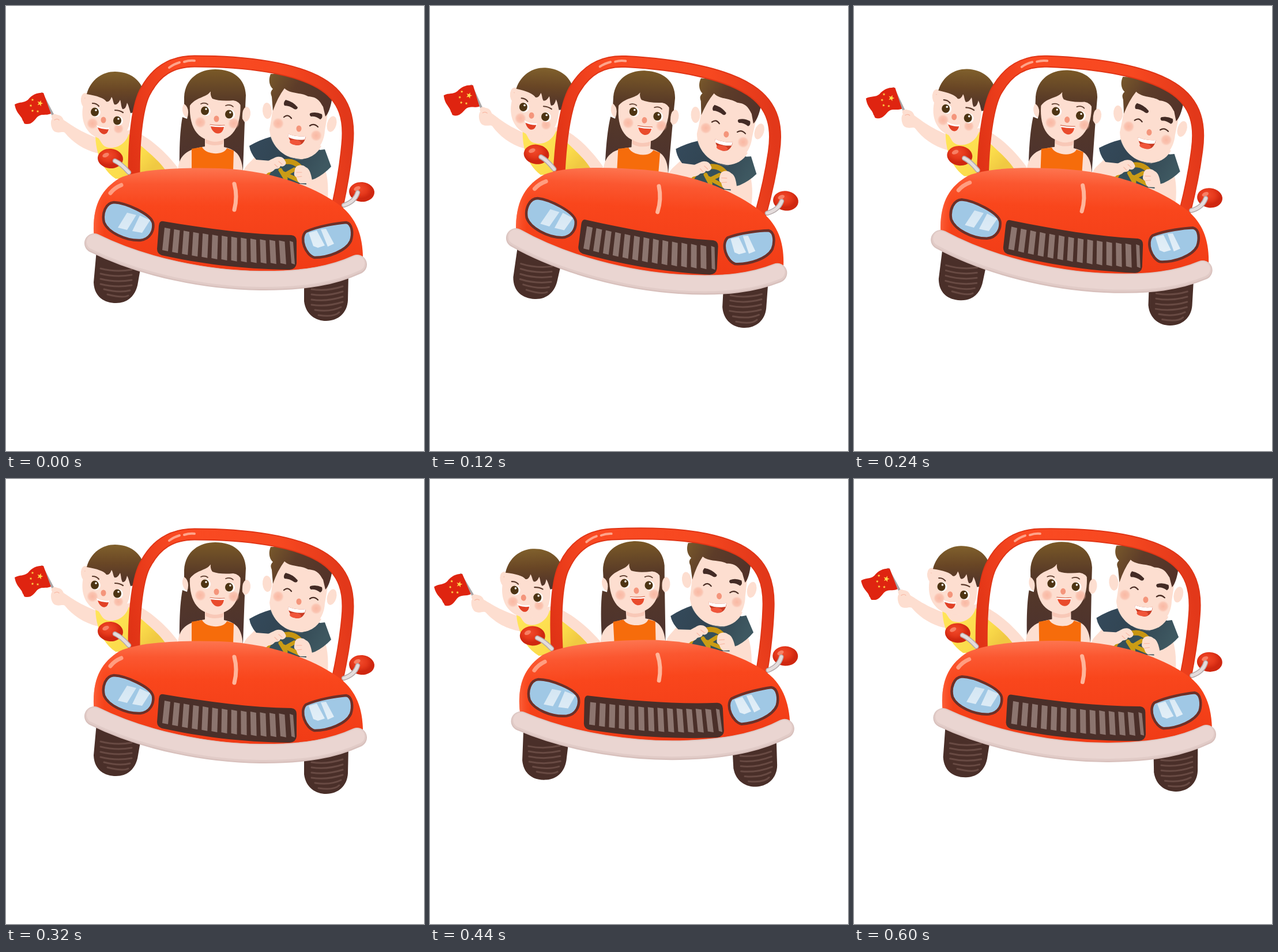
An HTML page that plays this animation: 725 by 773 pixels, repeating every 0.64 s.

```html
<!DOCTYPE html>
<html>
<head>
<meta charset="utf-8">
<style>
html, body { margin: 0; width: 100%; height: 100%; overflow: hidden; background: #fff; }
svg { display: block; width: 100%; height: 100%; }
</style>
</head>
<body>
<svg viewBox="0 0 725 773" fill="none" stroke-linecap="round" stroke-linejoin="round">
  <defs id="defs"></defs>
  <g id="scene"></g>
</svg>
<script>
const SKIN = '#fdded0', BLUSH = '#f9b8a3', BROWN = '#4a2f29', RED = '#e5381b';

const shape = (d, fill, extra = '') => `<path d="${d}" fill="${fill}" ${extra}/>`;
const line = (d, color, w) => `<path d="${d}" stroke="${color}" stroke-width="${w}"/>`;
const oval = (x, y, rx, ry, fill, rot = 0) =>
  `<ellipse cx="${x}" cy="${y}" rx="${rx}" ry="${ry}" fill="${fill}" transform="rotate(${rot} ${x} ${y})"/>`;
const gradient = (id, dir, ...stops) => {
  const [x1, y1, x2, y2] = dir;
  return `<linearGradient id="${id}" gradientUnits="userSpaceOnUse" x1="${x1}" y1="${y1}" x2="${x2}" y2="${y2}">` +
    stops.map(([at, c, o = 1]) => `<stop offset="${at}" stop-color="${c}" stop-opacity="${o}"/>`).join('') +
    '</linearGradient>';
};
const times = (n, f) => Array.from({ length: n }, (_, i) => f(i)).join('');

const eye = (x, y) => oval(x + 2, y + .5, 8, 8.5, '#fff') + oval(x, y, 7, 7.5, '#4d3413') +
  oval(x + 2, y - 3, 1.8, 1.8, '#fff');
const cheek = (x, y, r = 10) => oval(x, y, r, r, 'url(#blush)');
const nose = (x, y) => oval(x, y, 4.5, 5.5, '#f4957b');
const star = (x, y, r, turn) => {
  const pts = Array.from({ length: 10 }, (_, i) => {
    const a = turn + i * Math.PI / 5, q = i % 2 ? r * 0.4 : r;
    return `${x + q * Math.sin(a)},${y - q * Math.cos(a)}`;
  });
  return `<polygon points="${pts.join(' ')}" fill="#ffd84a"/>`;
};

const flag = () =>
  line('M62 152L86 198', '#a9a5a6', 4) +
  shape('M15 171C24 166 31 169 38 163C46 153 56 150 65 151L78 187C69 191 61 186 54 193C48 200 44 206 35 205C30 205 32 202 29 199C27 190 18 188 15 171Z', '#df2410') +
  star(59, 169, 5.5, 0.3) + star(46, 163, 2.6, 0) + star(43, 173, 2.6, 0.4) +
  star(46, 182, 2.6, 0.2) + star(55, 183, 2.6, 0);

const boy = () =>
  shape('M155 228C124 216 110 204 100 198C96 188 90 190 86 188C80 187 77 191 80 196C76 200 78 214 84 218C92 222 98 217 102 220C115 236 134 250 160 256Z', SKIN) +
  line('M84 198C87 196 90 196 92 198', BLUSH, 1.2) +
  shape('M158 226L218 215C250 228 278 255 298 281L280 295L200 297C170 285 160 260 158 226Z', SKIN) +
  shape('M155 226C165 230 163 240 174 245C190 250 208 240 213 222C222 236 262 262 277 286L240 300L190 300C166 284 156 255 155 226Z', 'url(#yellow)') +
  oval(139, 165, 9, 14, SKIN, -10) + line('M137 160Q142 164 141 171', BLUSH, 1.5) +
  shape('M142 150C130 172 129 198 141 215C154 234 184 238 201 227C216 217 218 190 215 165Z', SKIN) +
  cheek(150, 204) + cheek(195, 213, 9) +
  shape('M140 153C147 127 168 114 189 114C214 114 236 128 240 154L228 184L216 186C214 180 213 173 210 168C208 177 206 179 202 179C199 173 200 169 198 163C195 169 192 172 188 171C185 166 186 162 183 158C181 164 178 167 174 166C170 160 158 156 140 153Z', 'url(#hair)') +
  eye(154, 184) + eye(193, 199) +
  line('M150 169Q157 169 161 174M189 181Q197 181 203 185', '#5a3a2c', 2.2) + nose(169, 198) +
  shape('M157 207Q168 213 179 211C179 225 165 228 157 207Z', '#fff') +
  shape('M159 211Q169 215 178 214C176 226 164 226 159 211Z', '#e14126');

const girl = () =>
  oval(314, 181, 8, 13, SKIN, -8) + oval(416, 188, 8, 13, SKIN, 8) +
  shape('M309 158C311 125 336 110 363 110C394 110 415 126 416 155L415 176Q409 180 410 196L414 202L411 285L301 285Q300 225 306 193L314 196Q320 178 309 170Z', 'url(#hair2)') +
  shape('M345 225H378V245C398 249 409 258 411 288H298C299 262 310 249 345 244Z', SKIN) +
  shape('M346 231Q362 240 378 232L376 240Q358 245 346 238Z', '#f8c8b7') +
  shape('M322 248L340 245C347 259 378 260 383 247L395 251L394 286H322Z', '#f66c0b') +
  shape('M320 160C315 198 325 234 362 234C397 235 410 200 406 163Q362 135 320 160Z', SKIN) +
  cheek(337, 202) + cheek(395, 204) +
  shape('M317 176Q312 136 358 130Q408 132 410 178Q405 165 394 164Q371 166 358 161Q354 156 355 148C348 160 328 157 317 176Z', 'url(#hair2)') +
  eye(345, 182) + eye(387, 188) +
  line('M338 170Q345 167 350 171M381 173Q389 170 394 175', '#5a3a2c', 1.7) + nose(365, 196) +
  shape('M354 206Q366 209 379 207C378 226 358 226 354 206Z', '#fff') +
  shape('M355 209Q367 211 378 210C376 226 359 225 355 209Z', '#e94b2c') +
  line('M354 206Q366 208 379 207', '#d66a50', 1.2);

const man = () =>
  shape('M435 258C424 273 415 275 411 290L450 300L480 280ZM520 290L554 285Q560 305 558 335L510 310Z', SKIN) +
  shape('M422 243Q441 232 460 227L545 250L553 249L564 279Q552 292 536 300L500 312L443 302L449 288L459 269L434 267Q424 256 422 243Z', 'url(#navy)') +
  shape('M458 224C466 248 488 266 514 266C528 264 540 257 547 243Z', SKIN) +
  line('M459 228C467 248 490 268 514 267', '#526570', 1.5) +
  oval(453, 182, 8, 14, SKIN, -4) + oval(565, 205, 8, 14, SKIN, 15) +
  shape('M465 145C464 178 459 204 457 215C460 248 488 266 506 264C537 263 552 239 553 216L561 170L545 145L483 130Z', SKIN) +
  cheek(472, 204) + cheek(538, 225) +
  shape('M459 118C454 130 458 140 463 144C457 150 460 154 461 158L463 182Q471 159 483 143C493 153 512 150 524 157C540 158 544 165 550 175L554 192Q562 184 566 158L545 134L500 118Z', 'url(#hair3)') +
  shape('M485 163Q498 166 506 176Q505 181 500 179Q492 173 483 173Q480 168 485 163ZM528 186Q538 183 548 188Q550 195 545 197Q537 191 529 192Q525 189 528 186Z', '#432b25') +
  line('M482 193Q489 187 495 195M527 208Q534 203 541 210', '#4b2e25', 2.2) + nose(508, 213) +
  shape('M489 222Q503 228 520 226C517 249 492 247 489 222Z', '#c93c24') +
  shape('M489 222Q503 228 520 226L518 232Q502 234 490 228Z', '#fff') +
  oval(502, 237, 10, 4.5, '#f0553a', 8) +
  shape('M447 303C451 278 471 267 494 268Q519 273 521 310Z', '#35505a') +
  line('M449 302C454 280 470 270 490 270C505 271 515 282 517 300', '#c79511', 9) +
  line('M476 285L485 300M500 284L482 294M482 291L508 303', '#cb9c15', 7) +
  shape('M447 279C447 271 460 267 467 263C475 260 482 263 484 269C489 274 481 281 476 278C474 285 467 281 465 285C460 290 454 288 452 292L432 294Z', SKIN) +
  shape('M501 284C502 276 514 274 520 280C528 283 530 297 532 308L510 308C504 304 505 299 503 297C498 294 500 290 501 284Z', SKIN) +
  line('M466 275L471 280M473 270L479 275M504 289L513 289M505 297L513 296', BLUSH, 1.2);

const mirror = (x, y, arm) =>
  oval(x, y, 22, 17, 'url(#mirror)', 5) + oval(x - 8, y - 6, 6, 3.5, '#f78065', -25) +
  line(arm, '#b5a9aa', 8.5) + line(arm, '#e4dcdc', 5.5);

const frame = () => {
  const d = 'M222 292C222 230 228 170 243 146C260 115 285 96 327 96C420 96 500 108 545 134C590 160 596 200 592 240C588 285 582 315 575 347';
  return line(d, '#e03516', 21) + line(d, 'url(#tube)', 17) +
    line('M283 107Q291 101 301 98M309 97Q318 94 327 95', '#ffa48a', 4);
};

const tires = () =>
  shape('M157 425L152 480C153 505 170 516 191 516C212 516 226 502 229 480L236 440Z', BROWN) +
  shape('M517 480V513C520 537 538 547 555 547C576 547 592 533 593 511L594 465Z', BROWN) +
  times(6, i => {
    const y = 456 + i * 9, inset = i > 3 ? (i - 3) * 6 : 0;
    return line(`M${164 + inset} ${y}q27 7 ${54 - 1.5 * inset} 2`, '#684a43', 3) +
      line(`M${530 + inset} ${y + 36}q27 4 ${54 - 1.5 * inset} -5`, '#684a43', 3);
  });

const grille = () =>
  shape('M273 374C350 387 425 397 495 398Q504 399 504 408V447Q503 457 492 458C405 457 335 447 270 433Q262 430 262 422L265 382Q266 372 273 374Z', BROWN) +
  times(14, i => {
    const u = i / 13, x = 280 + 215 * u, lean = -4 + 7 * u;
    const top = 386 + 37 * u - 14 * u * u, end = 425 + 45 * u - 22 * u * u;
    const w = i === 13 ? 3 : 5;
    return shape(`M${x - w} ${top - 1}L${x + w} ${top + 1}L${x + lean + w} ${end + 1}L${x + lean - w} ${end - 1}Z`, '#8c756f');
  });

const lamps = () => {
  const rim = 'stroke="#6d3028" stroke-width="4.5"';
  return shape('M187 341C173 342 166 360 170 376C177 393 207 408 233 407C250 405 257 390 255 377C251 361 208 342 187 341Z', '#a0c8e5', rim) +
    shape('M520 392C542 382 576 377 590 376C601 378 602 396 598 408C590 425 560 437 535 437C520 433 508 404 520 392Z', '#a0c8e5', rim) +
    shape('M210 359L226 363L210 389L194 385ZM232 364L250 372L236 394L219 391Z', 'url(#gleam)') +
    shape('M525 394L539 390L553 416L541 420L533 417ZM546 388L555 387L569 413L558 418Z', 'url(#gleam)');
};

const body = () => {
  const bumper = 'M153 412C240 455 350 476 440 477C520 478 570 467 609 449';
  return shape('M152 390C151 345 166 318 197 299C232 283 305 280 370 282C455 285 532 311 580 347C608 369 620 400 619 445Q540 475 430 470Q260 460 153 408Z', 'url(#hood)') +
    shape('M152 390C151 345 166 318 197 299C175 330 168 360 170 416L153 408Z', 'url(#side)') +
    line('M181 325Q188 316 200 311', '#ff9d80', 7) +
    line('M396 309Q402 331 396 354', '#ffb499', 7) +
    line(bumper, '#d8c0bc', 34) +
    `<g transform="translate(0 -1)">${line(bumper, '#e1cbc7', 31)}</g>` +
    `<g transform="translate(0 -2)">${line(bumper, '#ead5d1', 26)}</g>` +
    lamps() + grille();
};

document.getElementById('defs').innerHTML =
  gradient('hair', [0, 114, 0, 180], [0, '#80602c'], [.5, '#694625'], [1, '#51342a']) +
  gradient('hair2', [0, 110, 0, 270], [0, '#7a5927'], [.35, '#573927'], [1, '#4d332e']) +
  gradient('hair3', [458, 118, 560, 185], [0, '#78582b'], [.4, '#5d3c29'], [1, '#513129']) +
  gradient('yellow', [165, 230, 235, 300], [0, '#ffe458'], [.7, '#fbdc4b'], [1, '#f0c942']) +
  gradient('navy', [430, 240, 540, 300], [0, '#34495a'], [.5, '#314451'], [1, '#3e5861']) +
  gradient('tube', [212, 270, 590, 200], [0, '#df3215'], [.3, '#fa4a22'], [.75, '#f74820'], [1, '#e2381a']) +
  gradient('hood', [0, 281, 0, 470], [0, '#fd7550'], [.15, '#fb5730'], [.35, '#f9461c'], [1, '#ef3a15']) +
  gradient('side', [152, 0, 175, 0], [0, '#ff7450', .6], [1, '#f9461c', 0]) +
  gradient('gleam', [0, 360, 0, 418], [0, '#fff', .55], [1, '#fff', .7]) +
  `<radialGradient id="mirror" cx=".4" cy=".35"><stop offset="0" stop-color="#f04a2b"/><stop offset=".6" stop-color="${RED}"/><stop offset="1" stop-color="#cf2710"/></radialGradient>` +
  `<radialGradient id="blush"><stop offset="0" stop-color="${BLUSH}"/><stop offset=".65" stop-color="${BLUSH}" stop-opacity=".7"/><stop offset="1" stop-color="${BLUSH}" stop-opacity="0"/></radialGradient>`;

const scene = document.getElementById('scene');
scene.innerHTML = flag() + boy() + girl() + man() + frame() +
  mirror(181, 265, 'M189 269Q200 274 213 289') +
  mirror(617, 323, 'M610 324Q605 340 586 346') +
  tires() + body();

// The car rocks in whole-degree steps: 0, 4, 0, -4, 0 over sixteen ticks.
const LOOP = 640, TICK = 40;
const start = performance.now();
function draw() {
  const n = Math.floor((performance.now() - start) % LOOP / TICK);
  const angle = 4 - Math.abs((n + 4) % 16 - 8);
  scene.setAttribute('transform', `rotate(${angle} 322 330)`);
  requestAnimationFrame(draw);
}
draw();
</script>
</body>
</html>
```
